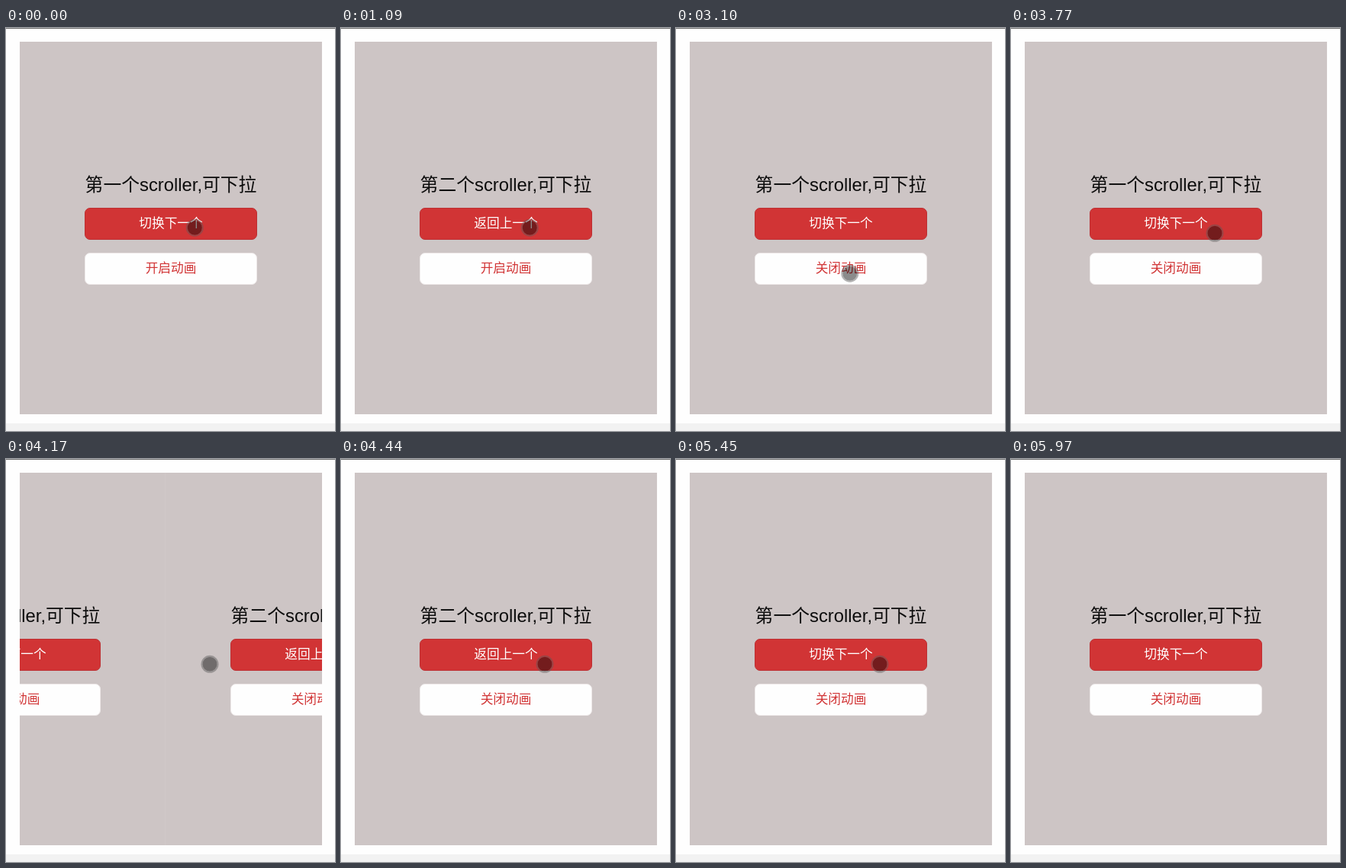
These frames come from a looping animation (431 px wide and 529 px high, 6400 ms). An HTML page:

```html
<!DOCTYPE html>
<html lang="zh-CN">
<head>
<meta charset="utf-8">
<style>
  html, body { margin: 0; width: 100%; height: 100%; overflow: hidden; background: #fefefe; }
  body { position: relative; font-family: "Liberation Sans", "Noto Sans CJK SC", "Noto Sans CJK", sans-serif; }
  .bar { position: absolute; left: 0; right: 0; }
  #top { top: 0; height: 1px; background: #6e6e6e; }
  #foot { top: 519px; bottom: 0; background: #f2f2f2; }
  #view { position: absolute; left: 18px; top: 18px; width: 396px; height: 489px; overflow: hidden; background: #cdc5c5; }
  #strip { position: absolute; width: 792px; height: 100%; }
  .page { position: absolute; top: 0; width: 396px; height: 100%; box-sizing: border-box; border-right: 1px solid #d0c8c8; }
  .page + .page { left: 396px; }
  .page div { position: absolute; left: 85px; width: 226px; text-align: center; white-space: nowrap; box-sizing: border-box; }
  .page .title { left: 75px; width: 246px; top: 174px; font-size: 23.8px; line-height: 28px; color: #0c0c0c; }
  .page .btn { height: 42px; line-height: 40px; font-size: 16.7px; border-radius: 7px; border: 1px solid; }
  .page .go { top: 218px; background: #d13435; border-color: #bd3033; color: #fff; }
  .page .anim { top: 277px; background: #fefefe; border-color: #eee9e9; color: #d13435; }
  #dot { position: absolute; left: -11.5px; top: -11.5px; width: 19px; height: 19px; border-radius: 50%;
    border: 2px solid rgba(90, 90, 90, .45); background: rgba(0, 0, 0, .45); background-clip: padding-box; }
</style>
</head>
<body>
<div id="top" class="bar"></div>
<div id="foot" class="bar"></div>
<div id="view"><div id="strip">
  <div class="page"><div class="title">第一个scroller,可下拉</div><div class="btn go">切换下一个</div><div class="btn anim"></div></div>
  <div class="page"><div class="title">第二个scroller,可下拉</div><div class="btn go">返回上一个</div><div class="btn anim"></div></div>
</div></div>
<div id="dot"></div>
<script>
const LOOP = 6400;
const strip = document.getElementById("strip");
const dot = document.getElementById("dot");
const toggles = document.querySelectorAll(".anim");

const scroll = [[0, 0], [1090, 396], [2270, 0],
  [4170, 205], [4290, 357], [4440, 396],
  [5030, 373], [5180, 96], [5300, 13], [5450, 0]];

const onSwitch = [246.8, 261.7], nudged = [245.5, 262.8];
const onToggle = [227.3, 321.7], onButton = [266.5, 268.8], corner = [375.5, 496];

const ease = p => p * p * (3 - 2 * p);
const between = (a, b, p) => a.map((v, i) => v + (b[i] - v) * ease(p));

const pointer = [[0, onSwitch], [2700, nudged], [2850, onToggle]];
for (let i = 1; i <= 4; i++) pointer.push([3290 + 120 * i, between(onToggle, onButton, i / 4)]);
pointer.push([5700, between(onButton, corner, .5)], [5820, corner], [5970, null]);

const at = (steps, t) => steps.filter(s => s[0] <= t).pop()[1];

function draw(t) {
  strip.style.transform = `translateX(${-at(scroll, t)}px)`;
  const label = t < 3100 ? "开启动画" : "关闭动画";
  toggles.forEach(b => { if (b.textContent !== label) b.textContent = label; });
  const pos = at(pointer, t);
  dot.style.visibility = pos ? "visible" : "hidden";
  if (pos) dot.style.transform = `translate(${pos[0]}px, ${pos[1]}px)`;
}

const start = performance.now();
function tick() {
  draw((performance.now() - start) % LOOP);
  requestAnimationFrame(tick);
}
tick();
</script>
</body>
</html>
```
